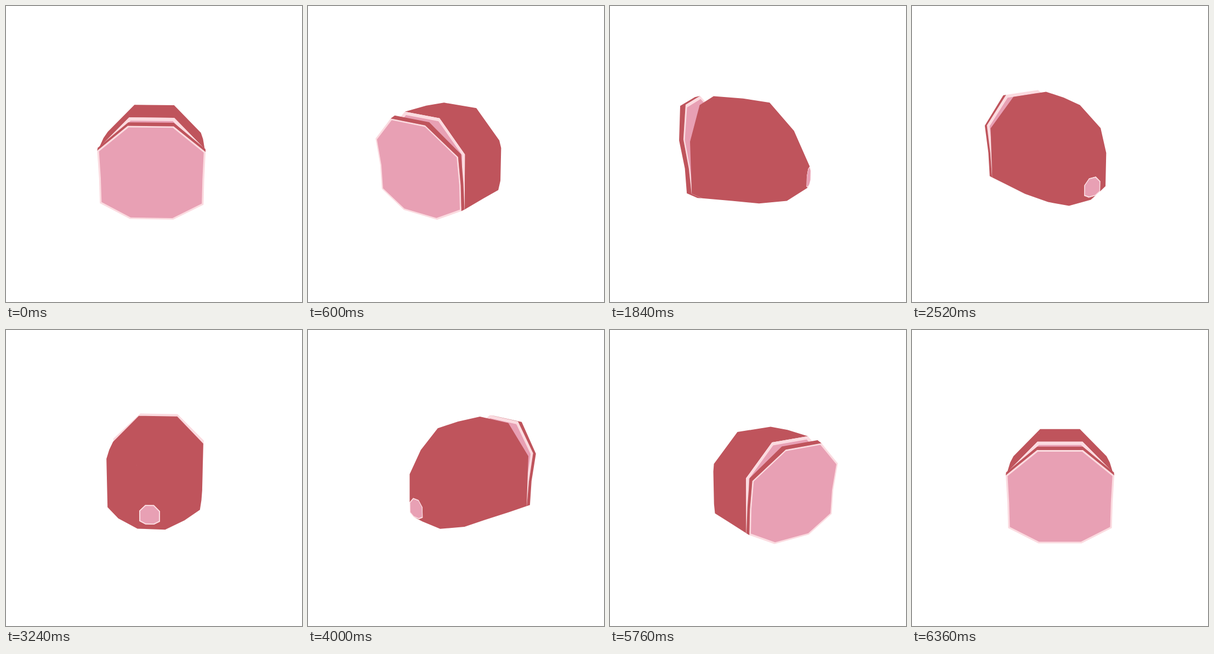
Animation, 540 px wide and 540 px high, one loop 6.4 s. Source, as an HTML page:

```html
<!DOCTYPE html>
<html lang="en">
<head>
<meta charset="utf-8">
<title>Turning ham</title>
<style>
  html, body { margin: 0; width: 100%; height: 100%; overflow: hidden; background: #fff; }
  svg { display: block; width: 100vw; height: 100vh; }
  .meat { fill: #bf545c; }
  .rim { fill: #fbdbe0; }
  .cut { fill: #e8a0b4; }
</style>
</head>
<body>
<svg viewBox="0 0 540 540">
  <g id="body"><path class="meat"/><path class="rim"/><path class="cut"/></g>
  <g id="slab"><path class="rim"/><path class="cut"/><path class="meat"/></g>
</svg>
<script>
const LOOP = 6400, STEP = 40, STEPS = LOOP / STEP;
const DIST = 1200, SIN = 0.306, COS = 0.952, CENTER = 270;

// Rows run from top to bottom as [half width, height, depth].
const outline = [[37, 93.7], [88, 41], [88, -55], [37, -83]];
const section = (scale, lift, z) => outline.map(([x, y]) => [x * scale, y * scale + lift, z]);
const bodyRows = [
  section(1, 0, 96.7),
  section(0.99, 0.3, 39),
  section(0.965, -1.7, -12),
  section(0.665, -20.5, -61),
  section(0.2, -36.5, -95)
];
const slabFront = [[36.5, 89.7, 134], [88.8, 42, 116.5], [88, -9, 108], [88, -55, 106], [37, -83.3, 106]];
const slabBack = [[36.5, 92.6, 123.5], [88.8, 44.5, 108.5], [88, -8, 100.6], [88, -55, 97], [37, -83, 97]];

function depthAt(rows, y) {
  let i = 0;
  while (i < rows.length - 2 && y < rows[i + 1][1]) i++;
  const [, y0, z0] = rows[i], [, y1, z1] = rows[i + 1];
  return z0 + (z1 - z0) * (y - y0) / (y1 - y0);
}

function inset(rows, width) {
  const mid = (rows[0][1] + rows[rows.length - 1][1]) / 2;
  const k = 1 - width / Math.max(...rows.map(row => row[0]));
  return rows.map(([x, y]) => {
    const h = mid + (y - mid) * k;
    return [x * k, h, depthAt(rows, h)];
  });
}

const mirror = ([x, y, z]) => [-x, y, z];
const ring = rows => [...rows, ...rows.map(mirror).reverse()];

// Faces list their corners clockwise as seen from outside.
const strips = (rows, facingBack) => rows.slice(1).map((low, i) => {
  const quad = [mirror(rows[i]), rows[i], low, mirror(low)];
  return facingBack ? quad.reverse() : quad;
});

function sides(frontRows, backRows) {
  const f = ring(frontRows), b = ring(backRows);
  return f.map((p, i) => {
    const j = (i + 1) % f.length;
    return [p, b[i], b[j], f[j]];
  });
}

const bodyFront = bodyRows[0], bodyEnd = bodyRows[bodyRows.length - 1];
const bodyFaces = {
  meat: bodyRows.slice(1).flatMap((rows, i) => sides(bodyRows[i], rows)),
  rim: [...strips(bodyFront), ...strips(bodyEnd, true)],
  cut: [...strips(inset(bodyFront, 5.5)), ...strips(inset(bodyEnd, 1.7), true)]
};
const slabFaces = {
  rim: [...strips(slabFront), ...strips(slabBack, true)],
  cut: [...strips(inset(slabFront, 3)), ...strips(inset(slabBack, 5.5), true)],
  meat: sides(slabFront, slabBack)
};

function projector(angle) {
  const c = Math.cos(angle), s = Math.sin(angle);
  return ([x, y, z]) => {
    const px = x * c - z * s, pz = x * s + z * c;
    const q = DIST / (DIST - y * SIN - pz * COS);
    return [CENTER + px * q, CENTER + (pz * SIN - y * COS) * q];
  };
}

function area(points) {
  return points.reduce((sum, [x, y], i) => {
    const [nx, ny] = points[(i + 1) % points.length];
    return sum + x * ny - nx * y;
  }, 0);
}

const svg = document.querySelector("svg");
const bodyGroup = document.getElementById("body");
const slabGroup = document.getElementById("slab");

function paint(group, faces, project) {
  for (const path of group.children) {
    const visible = faces[path.getAttribute("class")]
      .map(face => face.map(project))
      .filter(points => area(points) > 0);
    path.setAttribute("d", visible.map(points =>
      "M" + points.map(p => p.map(v => v.toFixed(2)).join(" ")).join("L") + "Z").join(""));
  }
}

function draw(time) {
  const step = Math.floor((time % LOOP) / STEP) + 1;
  const angle = step / STEPS * 2 * Math.PI;
  const project = projector(angle);
  paint(bodyGroup, bodyFaces, project);
  paint(slabGroup, slabFaces, project);
  // The slab is nearer only while the camera is on its side of the cut.
  const nearest = DIST * COS * Math.cos(angle) > 130 ? slabGroup : bodyGroup;
  if (svg.lastElementChild !== nearest) svg.append(nearest);
}

let start;
function tick(now) {
  start ??= now;
  draw(now - start);
  requestAnimationFrame(tick);
}
draw(0);
requestAnimationFrame(tick);
</script>
</body>
</html>
```
